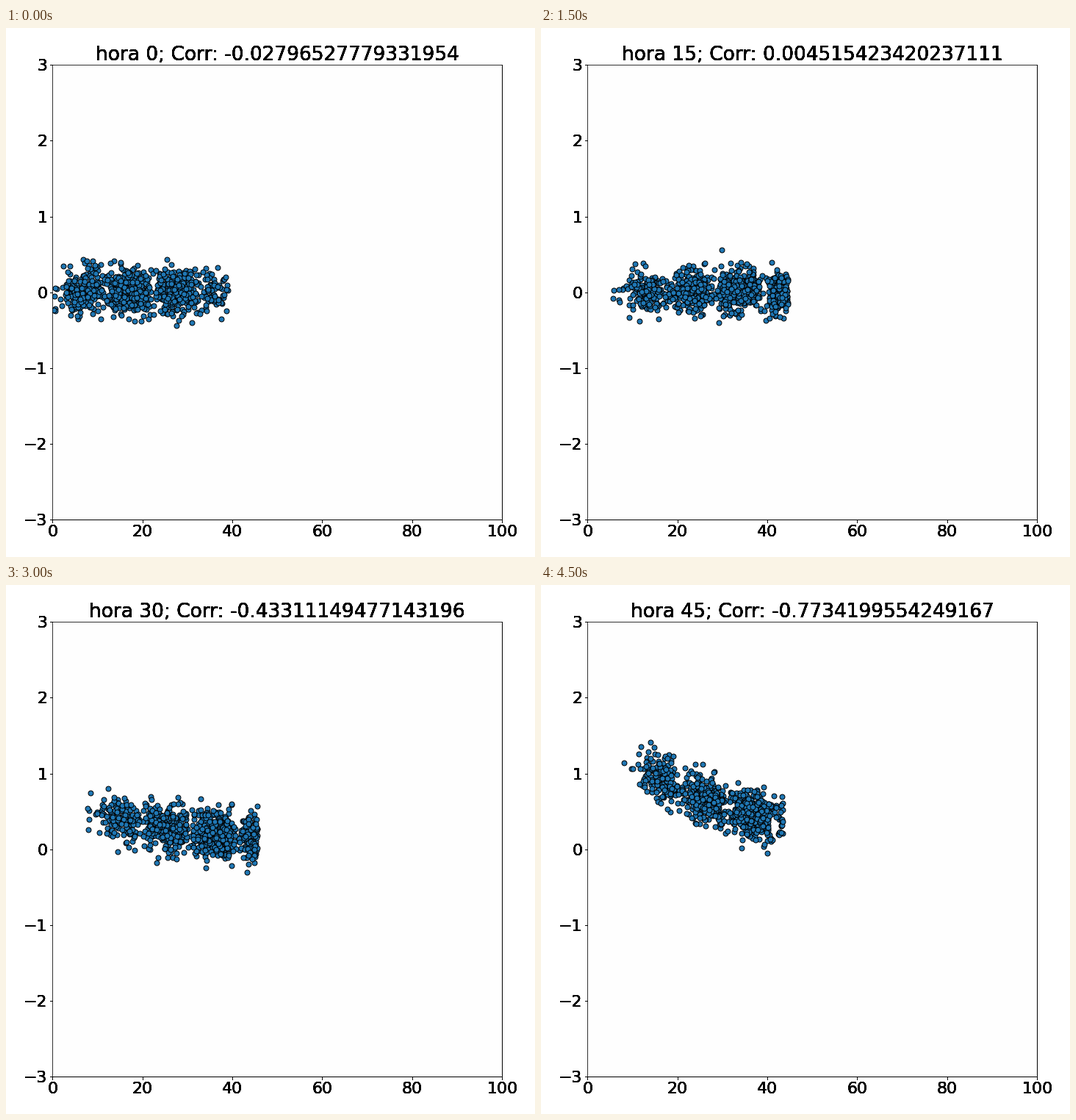
A matplotlib script for the animation above (5 s loop, 720 by 720 pixels).

```python
import matplotlib.pyplot as plt
import numpy as np
from matplotlib.animation import FuncAnimation

plt.rcParams.update({"font.family": "DejaVu Sans", "font.size": 22})

SIZE = 720
COUNT = 950
STEP = 5
LEFT, RIGHT, TOP, BOTTOM = 63.2, 675.3, 50.3, 669.2
LAYERS = 8  # repeated labels give heavy, hard-edged text

# one entry per step: correlation shown, x of a thin spot in the cloud
STEPS = [
    ("-0.02796527779331954", 22.5),
    ("-0.01382640957718263", 27),
    ("0.0023646798920304943", 22.5),
    ("0.004515423420237111", 28.5),
    ("-0.01809708884295489", 18),
    ("-0.18762043915527846", 24),
    ("-0.43311149477143196", 20),
    ("-0.6121012859392543", 25),
    ("-0.7085316402753918", 29),
    ("-0.7734199554249167", 20.7),
]


def sample_x(rng, hour, gap):
    """Beta-shaped spread with thin spots every 10.5 units."""
    low = np.interp(hour, [0, 10, 20, 45], [-1, 4, 6.5, 7.5])
    high = np.interp(hour, [0, 10, 20, 30, 45], [39.8, 43.8, 45.9, 45.6, 43.5])
    tail = max(1.8 - 0.04 * hour, 1.1)
    x = low + (high - low) * rng.beta(1.8, tail, 4 * COUNT)
    thin = np.cos(np.pi * (x - gap) / 10.5) ** 6
    return x[rng.random(x.size) > 0.85 * thin][:COUNT]


def cloud(hour, gap):
    rng = np.random.default_rng(100 + hour)
    x = sample_x(rng, hour, gap)
    trend = 0.065 * max(hour - 20, 0) * np.exp(-x / 28)
    return np.column_stack([x, trend + rng.normal(0.015, 0.15, x.size)])


def add_layer(base):
    ax = fig.add_axes([LEFT / SIZE, 1 - BOTTOM / SIZE,
                       (RIGHT - LEFT) / SIZE, (BOTTOM - TOP) / SIZE],
                      facecolor="#fefefe" if base else "none")
    ax.set(xlim=(0, 100), ylim=(-3, 3),
           xticks=range(0, 101, 20), yticks=range(-3, 4))
    if not base:
        ax.spines[["left", "top"]].set_visible(False)
    return ax


fig = plt.figure(figsize=(SIZE / 72, SIZE / 72), dpi=72, facecolor="white")
layers = [add_layer(k == 0) for k in range(LAYERS)]
titles = [ax.set_title("", pad=6, y=1.0) for ax in layers]
dots = layers[0].scatter([], [], s=48, c="#1f77b4", edgecolors="black",
                         linewidths=1)


def draw(i):
    corr, gap = STEPS[i]
    hour = STEP * i
    dots.set_offsets(cloud(hour, gap))
    for title in titles:
        title.set_text(f"hora {hour}; Corr: {corr}")
    return [dots, *titles]


anim = FuncAnimation(fig, draw, frames=len(STEPS), interval=500,
                     repeat=True, repeat_delay=0, blit=False)
plt.show()
```
